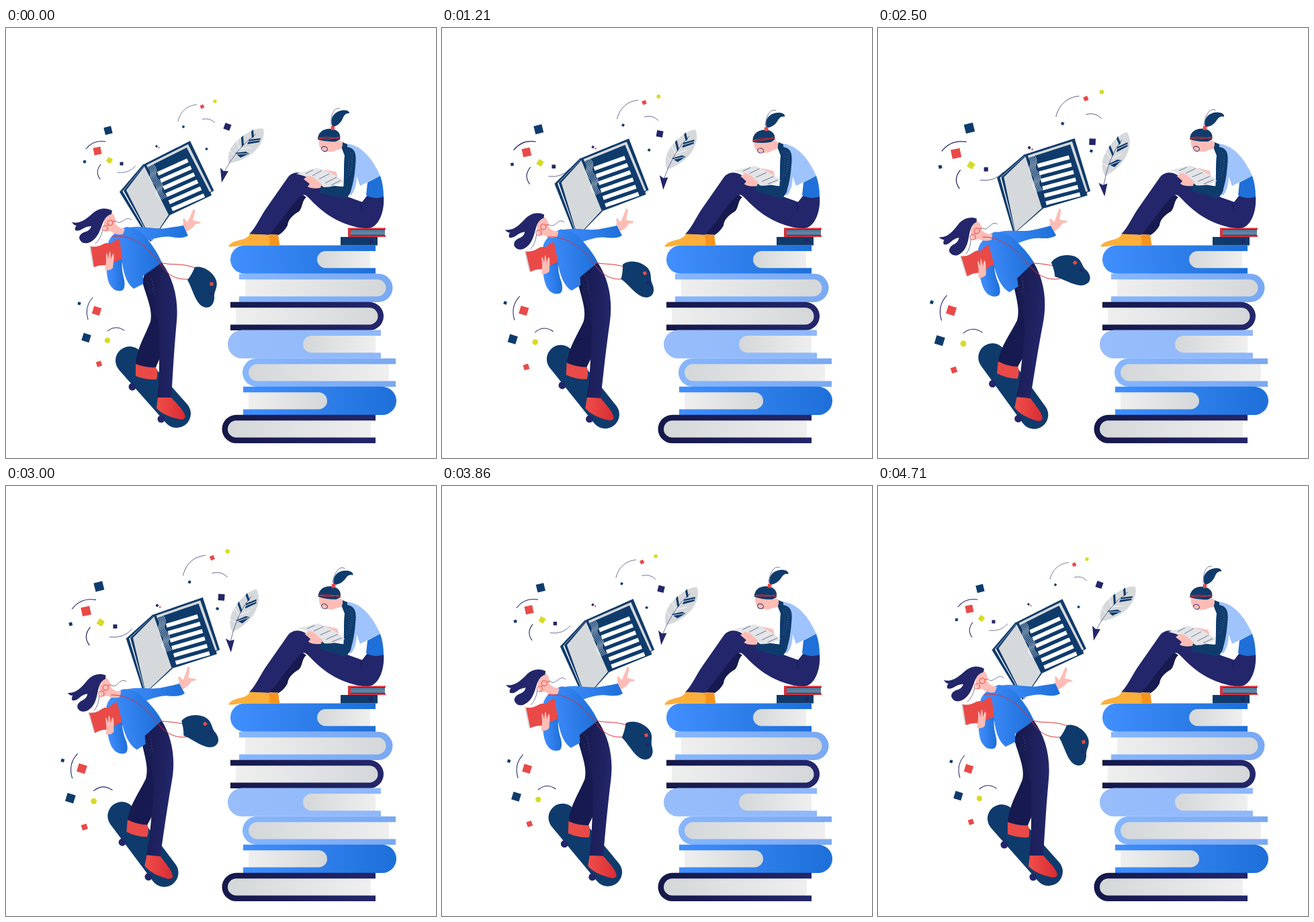
Recreate the animation shown at these times as an HTML page. Size 640 by 640 pixels, loop 4780 ms.

```html
<!DOCTYPE html>
<html lang="en">
<head>
<meta charset="utf-8">
<title>Readers</title>
<style>
  html, body { margin: 0; height: 100%; overflow: hidden; background: #fff; }
  svg { display: block; width: 100%; height: 100%; }
  .teal { fill: #0f3b6c; } .navy { fill: #23266a; } .dark { fill: #161a50; }
  .red { fill: #e94a48; } .lime { fill: #d7db22; } .skin { fill: #fdbdb6; }
  .sky { fill: #9fc3fc; } .gray { fill: #d6d9db; } .white { fill: #fff; }
  .line { fill: none; stroke: #23266a; stroke-width: 1; stroke-linecap: round; }
  .thin { fill: none; stroke: #23266a; stroke-width: .6; }
  .redline { fill: none; stroke: #dc3034; stroke-width: 1; }
  .whiteline { fill: none; stroke: #fff; stroke-width: .8; }
</style>
</head>
<body>
<svg viewBox="0 0 640 640">
  <defs>
    <linearGradient id="blue"><stop stop-color="#428fff"/><stop offset="1" stop-color="#1d6fd8"/></linearGradient>
    <linearGradient id="pale"><stop stop-color="#86b6fe"/><stop offset="1" stop-color="#7aa9f3"/></linearGradient>
    <linearGradient id="soft"><stop stop-color="#98bdfa"/><stop offset="1" stop-color="#8fb8fb"/></linearGradient>
    <linearGradient id="night"><stop stop-color="#151849"/><stop offset="1" stop-color="#23266a"/></linearGradient>
    <linearGradient id="pageR"><stop stop-color="#efefef"/><stop offset="1" stop-color="#d4d7d9"/></linearGradient>
    <linearGradient id="pageL"><stop stop-color="#d4d7d9"/><stop offset="1" stop-color="#efefef"/></linearGradient>
    <linearGradient id="shoe"><stop stop-color="#f04e4a"/><stop offset="1" stop-color="#d92c33"/></linearGradient>
  </defs>

  <g id="stack"></g>

  <!-- seated reader -->
  <path class="teal" d="M498 311H553V323.5H498Z"/><circle class="navy" cx="543" cy="317" r="3.5"/>
  <path fill="#d9313a" d="M509 297.5H565V300H563V308.500H565V311H509Z"/>
  <path class="teal" d="M513 300H564V308.500H513Z"/>
  <path class="whiteline" d="M513 302H564M513 304.300H564M513 306.600H564"/>
  <path class="dark" d="M436 244L447 252C440 257 442 267 436 273C426 279 420 285 419 294Q414 303 406 308L388 307Z"/>
  <path class="navy" d="M362 307C374 294 377 283 389 266L419 223C425 214 437 213 446 219C470 238 505 250 530 259L537 250H562C564 272 555 298 538 298C512 298 482 283 464 266C452 256 447 245 440 249C429 257 412 284 392 308Z"/>
  <path class="line" style="stroke:#161a50" d="M530 259Q527 266 530 273"/>
  <path fill="#fcaf3b" d="M331 325.500C335 317 345 317 354 314Q361 311 363 306.500L392 308H405L407 323.500H350Q340 326 331 325.500Z"/>
  <path fill="#f7941d" d="M390 307.500H405L407 323.500H392Q394 315 390 307.500Z"/>
  <path class="sky" d="M503 172C528 172 546 195 557 220L527 235L522 221Q522 238 514 249L501 244L505 190Z"/>
  <path fill="#1f70d8" d="M538 230L557 220Q562 234 562 251Q549 256 536 249Z"/>
  <path class="teal" d="M499 177L501 170L508 173V177C520 179 522 188 520 204C519 220 516 236 511 248L502 243C504 225 502 205 504 190Z"/>
  <path fill="none" stroke="#7592b8" stroke-width=".7" stroke-dasharray=".8 3" d="M507 184Q514 200 506 225M511 182Q518 200 510 222M515 186Q518 200 512 215"/>
  <g id="reading">
    <path class="teal" d="M468 233L500 236L511 235Q516 240 511 247C508 255 503 255 496 252L467 246Z"/>
    <path class="skin" d="M460 214Q468 209 480 212L491 214L494 222L480 220Z"/>
    <path fill="#e3e5e7" d="M432 217Q448 213 462 208Q486 214 503 228Q490 237 473 237Q455 222 432 217Z"/>
    <path class="thin" d="M446 217L457 211M456 220L470 212M466 225L481 217M475 231L492 222M484 234L498 227"/>
    <path class="skin" d="M443 225L449 220Q456 220 462 226Q467 230 470 232L468 238Q455 240 449 236L452 232Z"/>
  </g>
  <g id="head">
    <path class="skin" d="M466 166C464 178 470 183 478 184Q488 185 491 182L499 180Q503 172 499 168Q495 166 493 170L495 166Z"/>
    <path class="teal" d="M464 166C464 154 474 149 484 150C494 151 499 158 497 166L491 169Q477 170 464 166Z"/>
    <path class="redline" d="M464 164Q480 167 497 162M464 164Q480 161 497 165"/>
    <ellipse class="line" cx="474" cy="180" rx="4.500" ry="3.500" transform="rotate(20 474 180)"/>
    <g id="pony">
      <path class="teal" d="M486 147C482 136 486 128 495 124C503 121 511 122 511 127C504 127 503 131 501 135C498 142 493 145 488 147Z"/>
      <path class="thin" d="M484 145C483 132 487 117 497 120"/>
    </g>
    <path class="red" d="M483.500 146H489V152H483.500Z"/>
  </g>

  <!-- flying objects -->
  <g id="upper">
    <path class="line" d="M119 180Q130 166 148 169M140 225Q132 214 141 203"/>
    <path class="thin" d="M256 139C260 122 272 115 284 114M292 136Q303 133 311 141M165 215Q183 217 193 205"/>
  </g>
  <g id="lower"><path class="line" d="M122 434Q116 415 129 401M151 451Q163 441 176 450"/></g>
  <g id="feather">
    <path class="gray" d="M383 150C372 147 350 160 338 174C331 183 330 192 331 201C347 200 366 190 375 178C383 168 385 158 383 150Z"/>
    <path class="teal" d="M365 154L368 151L369 162L366 164ZM350 163L353 160L354 174L351 177ZM362 166L379 164L377 170L359 173ZM341 186L357 184L362 187L349 193Z"/>
    <path class="whiteline" d="M360 169L378 167M340 188L360 187M332 180L339 189M346 180L365 178M344 168L348 180"/>
    <path class="thin" d="M372 158Q345 176 323 217"/>
    <path class="navy" d="M319 208L324 213L331 213L321 230Z"/>
  </g>
  <g id="book">
    <path class="teal" d="M203 204L274 168L309.500 242L304.500 245L306 249L243 279Z"/>
    <path id="coverBack" class="teal"/><path id="coverGap" class="white"/>
    <path id="coverEdge" class="teal"/><path id="coverPage" class="gray"/>
    <path class="gray" d="M209 204L271 173L306 243L303 244L269 178L211 207Z"/>
    <g id="rows" fill="none" stroke="#fff"></g>
  </g>

  <!-- skater -->
  <g id="legs">
    <path stroke="#0f3b6c" stroke-width="42" stroke-linecap="round" d="M184 495L254 574"/>
    <circle class="navy" cx="188" cy="534" r="5.500"/><circle class="navy" cx="231" cy="582" r="5.500"/>
    <path class="red" d="M193 498L223 504Q227 514 224 523Q207 524 193 518Z"/>
    <path class="dark" d="M203 378C209 400 219 420 215 437C206 460 195 476 193 500Q208 506 223 505L236 475L240 400Z"/>
    <path fill="url(#shoe)" d="M226 549L246 550C255 560 266 570 267 579Q265 584 257 582Q234 577 224 566Z"/>
    <path fill="url(#night)" d="M203 377L208 360L231 348C250 373 257 405 254 437C250 480 248 520 246 550L225 550C229 520 228 490 228 455C228 425 212 400 203 377Z"/>
    <path fill="none" stroke="#7478a8" stroke-width=".7" stroke-dasharray=".8 4" d="M208 376Q216 384 212 397M213 370Q222 383 217 396M217 372L222 398"/>
  </g>
  <g id="torso">
    <g id="arm">
      <path class="skin" d="M262 297Q265 291 263 285Q265 281 268 287L270 289Q275 279 278 271Q282 267 281 275L278 286L289 289Q292 291 282 292Q278 299 268 303Z"/>
      <path fill="url(#blue)" d="M176 299C200 291 218 301 238 298Q253 296 264 294L271 309Q264 314 246 311C232 309 220 314 205 318Z"/>
    </g>
    <path fill="url(#blue)" d="M180 296C167 300 152 311 153 321Q156 339 173 350Q177 379 190 388L204 381V369L232 349Q224 330 207 310Q196 297 180 296Z"/>
    <path fill="url(#blue)" d="M153 316C150 340 147 365 154 381Q160 393 172 391Q178 389 176 375Q171 358 173 340Z"/>
    <g id="face">
      <path class="skin" d="M146 282L159 276Q164 283 163 291Q167 298 177 299L174 307Q163 309 155 302Q147 305 145 297Z"/>
      <path class="navy" d="M158 272C148 266 137 269 130 275C119 285 110 292 98 289Q101 294 105 294Q102 297 103 301Q108 303 114 299Q120 295 127 295Q125 302 116 304Q109 307 109 313Q112 322 122 320C137 315 140 300 145 288Q149 279 157 277Z"/>
      <path class="thin" d="M163 287C172 296 178 277 187 286M144 300Q141 314 133 321"/>
      <g class="redline" style="stroke-width:.8"><circle cx="155" cy="290" r="4"/><circle cx="147.500" cy="298" r="4"/><path d="M151 294L153 293M159 288L163 287"/></g>
    </g>
    <path class="gray" d="M124 324L129 326L133 354L129 356Z"/>
    <path class="red" d="M126 325C143 328 144 317 156 321Q162 315 169 314L173 344Q161 347 153 354Q141 351 131 356Z"/>
    <path class="skin" d="M147 360L149 348L149 336Q151 333 152 344L154 333Q156 331 156 344L159 336Q162 335 160 348L159 357Q155 362 147 360Z"/>
  </g>
  <path id="strapA" class="redline"/><path id="strapB" class="redline"/>
  <g id="bag">
    <path class="teal" d="M281 356C294 353 309 364 313 376C316 387 309 391 310 402C309 417 297 420 288 411C280 402 277 387 270 375Q276 368 281 356Z"/>
    <path class="red" d="M303.500 378.500H308.500V383.500H303.500Z"/><path class="navy" d="M302 393H307V398H302Z"/>
  </g>
</svg>
<script>
const LOOP = 4780;
const $ = id => document.getElementById(id);
const add = (id, markup) => $(id).insertAdjacentHTML('beforeend', markup);

// A lying book: covers open at one end and rounded at the other
function volume(open, tip, y, pageOpen, pageTip, fill) {
  const right = tip > open, side = right ? 1 : -1, sweep = right ? 1 : 0;
  const slab = (a, b, top, h, paint) =>
    `<path fill="${paint}" d="M${a} ${top}H${b - side * h / 2}a${h / 2} ${h / 2} 0 0 ${sweep} 0 ${h}H${a}Z"/>`;
  add('stack', slab(open, tip, y, 42.2, `url(#${fill})`)
    + `<rect class="white" x="${Math.min(open, pageOpen) - .5}" y="${y + 8.5}" width="${Math.abs(open - pageOpen) + 1}" height="25.2"/>`
    + slab(pageOpen, pageTip, y + 8.5, 25.2, `url(#page${right ? 'R' : 'L'})`));
}
volume(550, 334, 323.5, 542, 463, 'blue');
volume(347, 575.5, 365.7, 356, 565.5, 'pale');
volume(334, 562, 407.8, 342, 553.5, 'night');
volume(558, 330, 449.6, 550, 442, 'soft');
volume(580, 352, 491.7, 570, 361, 'pale');
volume(353, 581, 533.8, 361, 478, 'blue');
volume(550, 321.5, 575.8, 543, 330, 'night');

const square = (id, color, x, y, size, turn) => add(id,
  `<rect class="${color}" x="${-size / 2}" y="${-size / 2}" width="${size}" height="${size}" transform="translate(${x} ${y}) rotate(${turn})"/>`);
const dot = (id, x, y, r) => add(id, `<circle class="lime" cx="${x}" cy="${y}" r="${r}"/>`);
square('upper', 'teal', 152, 152.5, 11, -14);
square('upper', 'red', 136, 183, 11, -12);
square('upper', 'lime', 154, 197, 7.5, 32);
square('upper', 'navy', 172, 202, 5, 0);
square('upper', 'teal', 117, 199, 4, -14);
square('upper', 'navy', 224, 176, 3, 30);
square('upper', 'red', 227.5, 178, 2, 20);
square('upper', 'red', 292, 117, 5.2, -24);
square('upper', 'teal', 264, 147, 3.3, 25);
square('upper', 'teal', 298.5, 180, 3.3, 25);
dot('upper', 311, 109, 2.6);
square('lower', 'teal', 109, 410, 4.3, 20);
square('lower', 'red', 135, 421, 11.5, 17);
square('lower', 'teal', 119.5, 461, 11.5, 17);
square('lower', 'red', 138.5, 500, 7.5, -18);
dot('lower', 151, 465, 4);
square('feather', 'navy', 329.5, 147, 9.5, 20);

for (let i = 0; i < 6; i++) {
  const k = i / 5;
  add('rows', `<path stroke-width="6" d="M${226 + 21 * k} ${217 + 53 * k}L${270.500 + 24.5 * k} ${197 + 52 * k}"/>`);
}
for (let i = 0; i < 5; i++) {
  add('rows', `<path stroke-width=".7" d="M${210 + i * 2} ${206 - i}q7 6 5 13t5 12t4 11t7 14"/>`);
}

// Blend two paths that have the same commands
function blend(a, b, k) {
  const ends = b.match(/[\d.]+/g);
  let i = 0;
  return a.replace(/[\d.]+/g, n => +n + (ends[i++] - n) * k);
}
const move = (id, value) => $(id).setAttribute('transform', value);
const shape = (id, d) => $(id).setAttribute('d', d);
const spread = (x, y, s) => `translate(${x} ${y}) scale(${s}) translate(${-x} ${-y})`;

function draw(now) {
  const phase = now % LOOP / LOOP * 2 * Math.PI;
  const s = Math.sin(phase), p = (1 - Math.cos(phase)) / 2;
  const early = 1 - (1 - p) ** 3;
  const headTurn = -4.5 * s - 2 * s * s;
  const ponyTurn = 10.3 * p + 4.6 * s * s - 2.2 * s;

  move('upper', spread(219, 167, 1 + .24 * p));
  move('lower', spread(352, 425, 1 + .12 * p));
  move('feather', `translate(${16 * p} ${21 * p}) rotate(${-18.5 * p} 321 229)`);
  move('legs', `rotate(${5.6 * p} 225 352)`);
  move('torso', `rotate(${-8 * p} 231 349)`);
  move('arm', `rotate(${3 * p} 180 300)`);
  move('face', `rotate(${-2.5 * p} 172 302)`);
  move('bag', `translate(${-15 * p} ${-7 * p}) rotate(${-45 * p} 277 366)`);
  move('head', `rotate(${headTurn} 496 180)`);
  move('pony', `rotate(${ponyTurn - headTurn} 486 149)`);
  move('reading', `rotate(${4 * early} 512 246)`);

  // The front cover swings a little further than the rest of the book
  move('book', `translate(${18 * p - 5 * s} ${-4 * p - 1.5 * s}) rotate(${9 * p} 274 168)`);
  const tipX = 216 - 8.5 * early, tipY = 317 + 3.5 * early;
  shape('coverBack', `M169 244L204 203L${tipX} ${tipY + 1}L${tipX - 2} ${tipY}Z`);
  shape('coverGap', `M173.500 243L205 205L${tipX} ${tipY - 1}Z`);
  shape('coverEdge', `M175 242L206 204L243.500 279L${tipX + 1} ${tipY}Z`);
  shape('coverPage', `M179 241.500L206 206L242 278L${tipX + 1} ${tipY - 1}Z`);

  shape('strapA', blend(
    'M158 311C190 305 215 330 230 352C242 369 252 374 271 374',
    'M156 311C185 311 208 332 222 350C235 366 250 377 271 373', p));
  shape('strapB', blend(
    'M230 349C245 354 262 349 281 357',
    'M228 350C240 350 250 352 262 354', p));
  requestAnimationFrame(draw);
}
requestAnimationFrame(draw);
</script>
</body>
</html>
```
